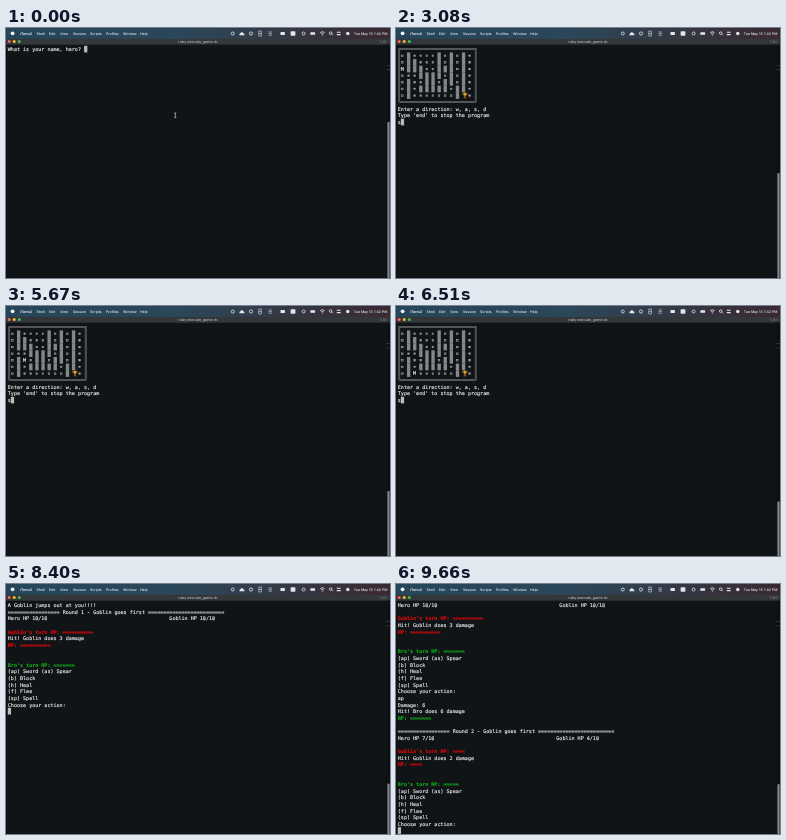
Recreate the animation shown at these times as an HTML page. Size 384 by 250 pixels, loop 9.8 s.

```html
<!DOCTYPE html>
<html lang="en">
<head>
<meta charset="utf-8">
<title>Terminal maze game</title>
<style>
  html, body { margin: 0; width: 100%; height: 100%; overflow: hidden; background: #101417; }
  svg { display: block; width: 100vw; height: 100vh; }
  text { white-space: pre; text-rendering: geometricPrecision; }
  .ui { font: 500 3.5px Inter, "Open Sans", sans-serif; fill: #e9eef1; }
  .term { font: 5.07px "DejaVu Sans Mono", "Liberation Mono", monospace; }
  .term text { fill: #eceeef; stroke: #eceeef; stroke-width: .14; }
  .term .red { fill: #e00808; stroke: #e00808; font-weight: bold; }
  .term .green { fill: #0fae18; stroke: #0fae18; font-weight: bold; }
  .icons { fill: none; stroke: #e4e7ea; stroke-width: .8; }
  .icons .solid { fill: #e4e7ea; stroke: none; }
</style>
</head>
<body>
<svg viewBox="0 0 384 250" preserveAspectRatio="none">
  <defs>
    <linearGradient id="bar">
      <stop offset="0" stop-color="#25465a"/>
      <stop offset=".45" stop-color="#2b475a"/>
      <stop offset=".65" stop-color="#323d4b"/>
      <stop offset="1" stop-color="#3a2831"/>
    </linearGradient>
  </defs>
  <rect width="384" height="250" fill="#101417"/>
  <rect width="384" height="11" fill="url(#bar)"/>
  <rect y="10.8" width="384" height="5.9" fill="#34373a"/>
  <circle cx="6.6" cy="5.3" r="1.9" fill="#f2f4f5"/>
  <g id="menu" class="ui"></g>
  <g class="icons">
    <circle cx="226.8" cy="5.5" r="1.5"/>
    <path class="solid" d="M233.3 7.2q.2-2.3 1.5-2.3q.9-1.6 2.2 0q1.6 .2 1.6 2.3z"/>
    <circle cx="245" cy="5.5" r="1.6"/>
    <path d="M252.8 3h2.6v5h-2.6zM252.8 5.5h2.6" opacity=".7"/>
    <path d="M262.5 4h3.4M262.5 5.6h3.4M262.5 7.2h3.4" opacity=".7"/>
    <rect class="solid" x="274.5" y="3.9" width="4.4" height="3.2" rx=".5"/>
    <rect class="solid" x="284.6" y="3.3" width="4.8" height="4.4" rx=".8"/>
    <circle cx="297.6" cy="5.5" r="1.5"/>
    <rect class="solid" x="304.3" y="4.2" width="4.8" height="2.6" rx=".6"/>
    <path d="M314.2 4.6q2.2-1.8 4.4 0M315.1 5.8q1.3-1 2.6 0"/>
    <circle class="solid" cx="316.4" cy="7" r=".6"/>
    <circle cx="324.7" cy="5.1" r="1.3"/><path d="M325.7 6.1l1.2 1.2"/>
    <path d="M330.8 4.3h3.8M330.8 6.6h3.8" stroke-width="1.1"/>
    <circle class="solid" cx="341.8" cy="5.5" r="1.7"/>
  </g>
  <circle cx="3.2" cy="13.4" r="1.5" fill="#fb5f57"/>
  <circle cx="8.2" cy="13.4" r="1.5" fill="#f3bb2f"/>
  <circle cx="13.3" cy="13.4" r="1.5" fill="#3fc24b"/>
  <text class="ui" x="192" y="14.8" text-anchor="middle" style="font-size:3.7px;fill:#b9bdbf">ruby execute_game.rb</text>
  <text class="ui" x="381" y="14.8" text-anchor="end" style="font-size:3.4px;fill:#777c80">⌥⌘1</text>
  <rect x="379.8" y="16.7" width="4.2" height="234" fill="#0d1113"/>
  <path d="M380.4 37.5h3.6M380.4 41.8h3.6" stroke="#3a3e41" stroke-width=".8"/>
  <rect id="thumb" x="381.4" width="2.2" fill="#84888a"/>
  <g id="screen" class="term"></g>
  <path id="beam" d="M168.3 85h2M169.3 85v4.6M168.3 89.6h2" fill="none" stroke="#c9cccd" stroke-width=".7"/>
</svg>
<script>
const LOOP = 9800, LEFT = 1.8, TOP = 17.8, CW = 3.052, RH = 6.632;
const $ = id => document.getElementById(id);
const colX = c => LEFT + c * CW;
const rowY = r => TOP + r * RH;

const menu = [[14, 'iTerm2'], [30.6, 'Shell'], [43, 'Edit'], [54, 'View'], [67, 'Session'],
  [84, 'Scripts'], [100, 'Profiles'], [117, 'Window'], [134, 'Help'],
  [347.8, 'Tue May 13'], [368, '1:42 PM']];
$('menu').innerHTML = menu.map(([x, s], i) =>
  `<text x="${x}" y="6.7"${i ? '' : ' font-weight="700"'}>${s}</text>`).join('') +
  '<text x="287" y="6.8" text-anchor="middle" font-weight="700" style="fill:#26333d">A</text>';

// '#' wall, '.' floor, 'T' trophy
const maze = [
  '.#....#.#.#.',
  '.##...#.#.#.',
  '.###..###.#.',
  '...####.#.#.',
  '.#..##.##.#.',
  '.#.#####.##.',
  '.#.......#T.'
];

// [time, hero column, hero row, typed key, screens scrolled away]
const steps = [
  [910, 0, 0, '', 0], [1610, 0, 0, 's', 0],
  [1890, 0, 1, '', 1], [2240, 0, 1, 's', 1],
  [2660, 0, 2, '', 2], [3080, 0, 2, 's', 2],
  [3360, 0, 3, '', 3], [3640, 0, 3, 'd', 3],
  [3990, 1, 3, '', 4], [4550, 1, 3, 'd', 4],
  [4900, 2, 3, '', 5], [5180, 2, 3, 's', 5],
  [5460, 2, 4, '', 6], [5670, 2, 4, 's', 6],
  [5880, 2, 5, '', 7], [6160, 2, 5, 's', 7],
  [6230, 2, 6, '', 8], [6510, 2, 6, 's', 8]
];

const line = (s, r, c = 0) => {
  const tint = s[0] === '!' ? 'red' : s[0] === '+' ? 'green' : '';
  return `<text class="${tint}" x="${colX(c)}" y="${rowY(r) + 5.25}">${tint ? s.slice(1) : s}</text>`;
};
const cursor = (c, r) =>
  `<rect x="${colX(c)}" y="${rowY(r)}" width="${CW + .2}" height="${RH}" fill="#b9bcbd"/>`;

// Prints lines from the top; the cursor follows the last one.
const print = lines => lines.map((s, r) => s && line(s, r)).join('') +
  cursor(lines[lines.length - 1].length, lines.length - 1);

function trophy(x, y) {
  return `<g transform="translate(${x} ${y})" fill="#e9a227">
    <path d="M-1.7 -2.7h3.4q0 3.1-1.7 3.4q-1.7-.3-1.7-3.4z"/>
    <path d="M-1.6-2.1h-.9q0 1.6 1.4 1.8M1.6-2.1h.9q0 1.6-1.4 1.8" fill="none" stroke="#c9861c" stroke-width=".5"/>
    <path d="M-.4 .5h.8v1.2h-.8z"/><path d="M-1.3 1.6h2.6v1.2h-2.6z" fill="#8d5426"/></g>`;
}

function cell(kind, c, r) {
  const x = colX(1 + 2 * c), y = rowY(r + 1);
  if (kind === '#') return `<rect x="${x}" y="${y}" width="${CW + .3}" height="${RH + .05}" fill="#858889"/>`;
  if (kind === 'T') return trophy(x + CW, y + RH / 2);
  if (kind === 'M') return line('M', r + 1, 1 + 2 * c);
  return `<rect x="${x + .8}" y="${y + 2.6}" width="1.5" height="1.5" fill="none" stroke="#a9acad" stroke-width=".6"/>`;
}

function frame(spread) {
  const x = colX(.5) - spread, y = rowY(.5) - spread;
  return `<rect x="${x}" y="${y}" width="${25 * CW + 2 * spread}" height="${8 * RH + 2 * spread}"
    fill="none" stroke="#a4a7a8" stroke-width=".45"/>`;
}

function mazeScreen([, hc, hr, key]) {
  const cells = maze.map((row, r) => [...row].map((k, c) =>
    cell(c === hc && r === hr ? 'M' : k, c, r)).join('')).join('');
  return frame(.5) + frame(-.5) + cells +
    line('Enter a direction: w, a, s, d', 9) +
    line("Type 'end' to stop the program", 10) +
    line(key, 11) + cursor(key.length, 11);
}

const hp = n => '≈'.repeat(n);
const actions = ['(ap) Sword (as) Spear', '(b) Block', '(h) Heal', '(f) Flee', '(sp) Spell', 'Choose your action:'];
const round = (n, hero, goblin, hit, before, after, left) => [
  '='.repeat(17) + ` Round ${n} - Goblin goes first ` + '='.repeat(25),
  `Hero HP ${hero}/10` + ' '.repeat(40) + `Goblin HP ${goblin}/10`,
  '',
  "!Goblin's turn HP: " + hp(before),
  `Hit! Goblin does ${hit} damage`,
  '!HP: ' + hp(after),
  '', '',
  "+Bro's turn HP: " + hp(left),
  ...actions
];
const intro = 'A Goblin jumps out at you!!!!';
const first = round(1, 10, 10, 3, 10, 10, 7);
const second = round(2, 7, 4, 2, 4, 4, 5);

function scene(t) {
  if (t < 910) {
    const name = t < 140 ? '' : t < 420 ? 'B' : t < 560 ? 'Br' : 'Bro';
    return { key: 'name' + name, ratio: 1.494, draw: () => print(['What is your name, hero? ' + name]) };
  }
  if (t < 7000) {
    const step = steps.filter(s => s[0] <= t).pop();
    return { key: 'maze' + step[0], ratio: 1.536 + .343 * step[4], draw: () => mazeScreen(step) };
  }
  if (t < 7140) return { key: 'intro', ratio: 4.623, draw: () => print([intro, '']) };
  if (t < 9660) {
    const typed = t < 8750 ? '' : t < 8960 ? 'a' : 'ap';
    return { key: 'fight' + typed, ratio: 4.623, draw: () => print([intro, ...first, typed]) };
  }
  return {
    key: 'next', ratio: 4.68,
    draw: () => print([...first.slice(1), 'ap', 'Damage: 6', 'Hit! Bro does 6 damage', '+HP: ' + hp(7), '', ...second, ''])
  };
}

let shown = '';
function update(now) {
  const t = now % LOOP, s = scene(t);
  $('beam').style.display = t < 140 ? '' : 'none';
  if (s.key !== shown) {
    shown = s.key;
    $('screen').innerHTML = s.draw();
    const h = 233 / s.ratio;
    $('thumb').setAttribute('y', 250 - h);
    $('thumb').setAttribute('height', h);
  }
}

const start = performance.now();
function tick() {
  update(performance.now() - start);
  requestAnimationFrame(tick);
}
tick();
</script>
</body>
</html>
```
